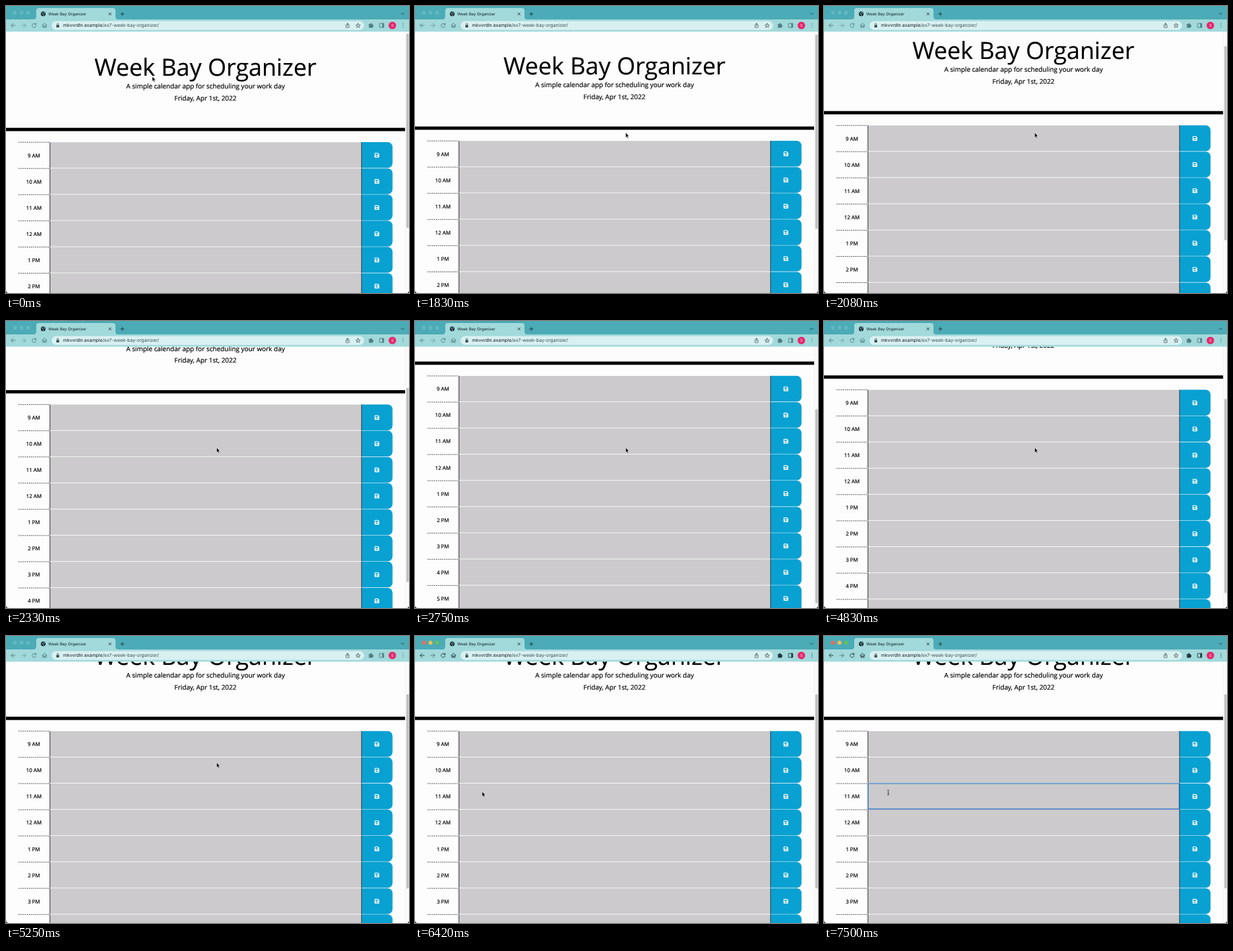
An HTML page for the animation above (8 s loop, 600 px wide and 428 px high).

```html
<!DOCTYPE html>
<html lang="en">
<head>
<meta charset="utf-8">
<title>Week Bay Organizer</title>
<style>
  html, body { margin: 0; width: 100%; height: 100%; overflow: hidden; background: #222; }
  svg { display: block; width: 100vw; height: 100vh; text-rendering: geometricPrecision; }
  .page { font-family: "Open Sans", sans-serif; fill: #000; text-anchor: middle; }
  .page text { stroke: #000; stroke-width: .2; }
  .ui { font-family: Inter, Roboto, sans-serif; }
  .icon { fill: none; stroke: currentColor; stroke-width: .9; stroke-linecap: round; stroke-linejoin: round; }
</style>
</head>
<body>
<svg id="stage" viewBox="0 0 600 428" xmlns="http://www.w3.org/2000/svg"></svg>
<script>
const LOOP = 8000, STEP = 1000 / 12;
const ROW_TOP = 203.1, ROW_H = 39.06;
const HOURS = ["9 AM", "10 AM", "11 AM", "12 AM", "1 PM", "2 PM", "3 PM", "4 PM", "5 PM"];
const NAME = "Week Bay Organizer";

const text = (x, y, size, str, extra = "") =>
  `<text x="${x}" y="${y}" font-size="${size}" ${extra}>${str}</text>`;
const rect = (x, y, w, h, fill, extra = "") =>
  `<rect x="${x}" y="${y}" width="${w}" height="${h}" fill="${fill}" ${extra}/>`;
const icon = (x, y, d, extra = "") =>
  `<path class="icon" transform="translate(${x} ${y})" d="${d}" ${extra}/>`;

const row = (label, i) => `
  <g transform="translate(0 ${ROW_TOP + i * ROW_H})">
    <path d="M18.5 .1H65" stroke="#222" stroke-width=".75" stroke-dasharray="2 1.1"/>
    ${rect(65.5, .1, 464, 38.2, "#cccacc")}
    <path d="M529.5 0h38.8a7.2 7.2 0 0 1 7.2 7.2v24.1a7.2 7.2 0 0 1-7.2 7.2h-38.8z" fill="#08a1d1"/>
    <path d="M65.4 0V38.6M529.3 0V38.6" stroke="#222" stroke-width=".9"/>
    ${text(41.5, 22.5, 7.8, label)}
    <path transform="translate(552.2 19.4)" fill="#fff" fill-rule="evenodd"
      d="M-2.7-3.5H1.8L3.5-1.8V2.8Q3.5 3.5 2.8 3.5H-2.8Q-3.5 3.5-3.5 2.8V-2.8Q-3.5-3.5-2.7-3.5z
         M-2.4-2.4V-.5H1.5V-2.4z M-1.1 1.4a1.1 1.1 0 0 0 2.2 0a1.1 1.1 0 0 0-2.2 0z"/>
  </g>`;

const focusY = ROW_TOP + 2 * ROW_H;
const page = `
  <g id="page" class="page">
    ${text(297, 104.2, 35.3, NAME)}
    ${text(297, 123.4, 9.8, "A simple calendar app for scheduling your work day")}
    ${text(297, 141, 9.8, "Friday, Apr 1st, 2022")}
    ${rect(0, 181.7, 594.5, 4.9, "#000")}
    ${HOURS.map(row).join("")}
    <g id="focus">
      ${rect(65.6, focusY + .1, 463.4, 38.2, "none", 'rx=".8" stroke="#1766c5" stroke-width="1.2"')}
      <path id="caret" d="M73 ${focusY + 3.4}v9.6" stroke="#111" stroke-width=".7"/>
    </g>
  </g>`;

const lights = ["#ed6a5e", "#f5bf4f", "#61c554"];
const chrome = `
  <g class="ui">
    ${rect(0, 0, 600, 20, "#4babb6")}
    ${rect(0, 20, 600, 18.3, "#a2d9db")}
    <path d="M41 20Q45 20 45 16V7Q45 3 49 3H159Q163 3 163 7V16Q163 20 167 20z" fill="#a2d9db"/>
    ${lights.map((c, i) => `<circle class="light" data-on="${c}" cx="${13.3 + i * 9.8}" cy="10" r="2.9"/>`).join("")}
    <circle cx="55.4" cy="11.7" r="3.5" fill="#14262a"/>
    <path d="M53 10.7q1.6.2 2 1.3t1.2 1.3l-.8 1.4M55.8 9.1l.4 1.2 1.7.5" fill="none" stroke="#a2d9db" stroke-width=".9"/>
    ${text(63, 14, 5.9, NAME, 'fill="#0e2023"')}
    <g color="#21383b">
      ${icon(154.8, 11.8, "M-1.7-1.7L1.7 1.7M1.7-1.7L-1.7 1.7")}
      ${icon(173.2, 11.9, "M-2.5 0H2.5M0-2.5V2.5")}
      ${icon(590.5, 11.8, "M-2-1L0 1L2-1")}
    </g>
    ${rect(68, 22.5, 465, 13.2, "#d9f0f1", 'rx="6.6"')}
    <g id="tools">
      ${icon(10.7, 29, "M3 0H-3M0-3L-3 0L0 3")}
      ${icon(26.5, 29, "M-3 0H3M0-3L3 0L0 3", 'opacity=".6"')}
      ${icon(42, 29, "M2.4-1.8A3 3 0 1 0 2.9.7M2.8-3.3V-1.2H.7")}
      ${icon(57.3, 29, "M-3.5 0L0-3.3L3.5 0M-2.4-.8V3H-.8V.6H.8V3H2.4V-.8")}
      ${icon(543.3, 29, "M-2.6-1.6H-.8a.9.9 0 1 1 1.6 0H2.2V0a.9.9 0 1 1 0 1.6V3H-2.6V1.6a.9.9 0 0 0 0-1.6z", 'style="fill:currentColor"')}
      ${icon(559.5, 29, "M-3-2.9H3V2.9H-3zM1-2.9V2.9M2-2.9V2.9")}
      ${icon(591, 29, "M0-2.6V-2.6M0 0V0M0 2.6V2.6", 'style="stroke-width:1.3"')}
    </g>
    <g color="#3b5357">
      ${rect(75, 28.3, 4.2, 3.7, "#3b5357", 'rx=".5"')}
      ${icon(77.1, 28.3, "M-1.2 0V-1.2A1.2 1.2 0 0 1 1.2-1.2V0", 'style="stroke-width:.7"')}
      ${icon(508.5, 29, "M-1-1H-2.3V3.2H2.3V-1H1M0 1V-3.3M-1.3-2.1L0-3.4L1.3-2.1", 'style="stroke-width:.7"')}
      ${icon(524.2, 29.2, "M0-3.3L.9-1L3.3-.9L1.4.6L2.1 2.9L0 1.6L-2.1 2.9L-1.4.6L-3.3-.9L-.9-1z", 'style="stroke-width:.75"')}
    </g>
    ${text(85, 31.4, 6.8, 'mkvvrdln.example<tspan fill="#354d50">/ex7-week-bay-organizer/</tspan>', 'fill="#0c1a1c"')}
    <circle cx="575.2" cy="29" r="5.6" fill="#e8256b"/>
    ${text(575.2, 31, 5.6, "S", 'fill="#fff" text-anchor="middle"')}
  </g>`;

const stage = document.getElementById("stage");
stage.innerHTML = `
  <defs><clipPath id="win"><path d="M0 0H600V423.5Q600 428 595.5 428H4.5Q0 428 0 423.5z"/></clipPath></defs>
  ${rect(0, 0, 600, 428, "#222")}
  <g clip-path="url(#win)">
    ${rect(0, 0, 600, 428, "#fdfdfe")}
    ${page}
    ${rect(594.5, 38, 5.5, 390, "#fafafa")}
    <path d="M594.7 38V428" stroke="#e6e6e6" stroke-width=".5"/>
    <rect id="thumb" x="596" y="41" width="3.6" height="290" rx="1.8" fill="#c0c0c1"/>
    ${chrome}
  </g>
  <path id="arrow" d="M0 0V7.4L1.7 5.9L2.9 8.6L4.2 8L3 5.4H5.3z" fill="#000" stroke="#fff" stroke-width=".6"/>
  <path id="beam" d="M-1.6-3.6Q0-3.6 0-2.8Q0-3.6 1.6-3.6M0-2.8V2.8M-1.6 3.6Q0 3.6 0 2.8Q0 3.6 1.6 3.6M-.8.9H.8" fill="none" stroke="#333" stroke-width=".8"/>`;

const $ = id => document.getElementById(id);
const parts = Object.fromEntries(
  ["page", "focus", "caret", "thumb", "tools", "arrow", "beam"].map(id => [id, $(id)]));
const lightEls = [...document.querySelectorAll(".light")];

const clamp = u => Math.max(0, Math.min(1, u));
const smooth = u => u * u * (3 - 2 * u);
const ease = (t, a, b) => smooth(clamp((t - a) / (b - a)));
const show = (el, on) => el.setAttribute("visibility", on ? "visible" : "hidden");
const place = (el, x, y) => el.setAttribute("transform", `translate(${x} ${y})`);

// Wheel push, momentum decay, then two pulls back up.
function scrollAt(t) {
  if (t < 1830) return 0;
  if (t < 2333) return 2 + 76.5 * Math.pow((t - 1830) / 503, 1.75);
  if (t < 3900) return 125.8 - 47.3 * Math.exp(-(Math.min(t, 3090) - 2333) / 178);
  return 125.4 - 7.4 * ease(t, 4120, 4420) - 56.7 * ease(t, 4590, 5250);
}

function pointerAt(t) {
  const moves = [[0, 834, 121, 34], [1080, 1420, -25.2, 49.8], [5410, 6170, -212.8, 43], [6330, 6670, -5, 1.7]];
  return moves.reduce(([x, y], [a, b, dx, dy]) => {
    const k = ease(t, a, b);
    return [x + dx * k, y + dy * k];
  }, [217.7, 105]);
}

function draw(time) {
  const t = Math.floor((time % LOOP + 4) / STEP) * STEP;
  const s = scrollAt(t), [x, y] = pointerAt(t);
  const active = t >= 6410, typing = t >= 6490;
  place(parts.page, 0, -s);
  parts.thumb.setAttribute("y", 41 + s * .745);
  place(parts.arrow, x, y);
  place(parts.beam, x, y);
  show(parts.arrow, !typing);
  show(parts.beam, typing);
  show(parts.focus, t >= 6990);
  show(parts.caret, t >= 6990 && t < 7490);
  parts.tools.setAttribute("color", active ? "#20363a" : "#527d83");
  lightEls.forEach(el => el.setAttribute("fill", active ? el.dataset.on : "#62b8c1"));
}

const start = performance.now();
function tick() {
  draw(performance.now() - start);
  requestAnimationFrame(tick);
}
draw(0);
requestAnimationFrame(tick);
</script>
</body>
</html>
```
